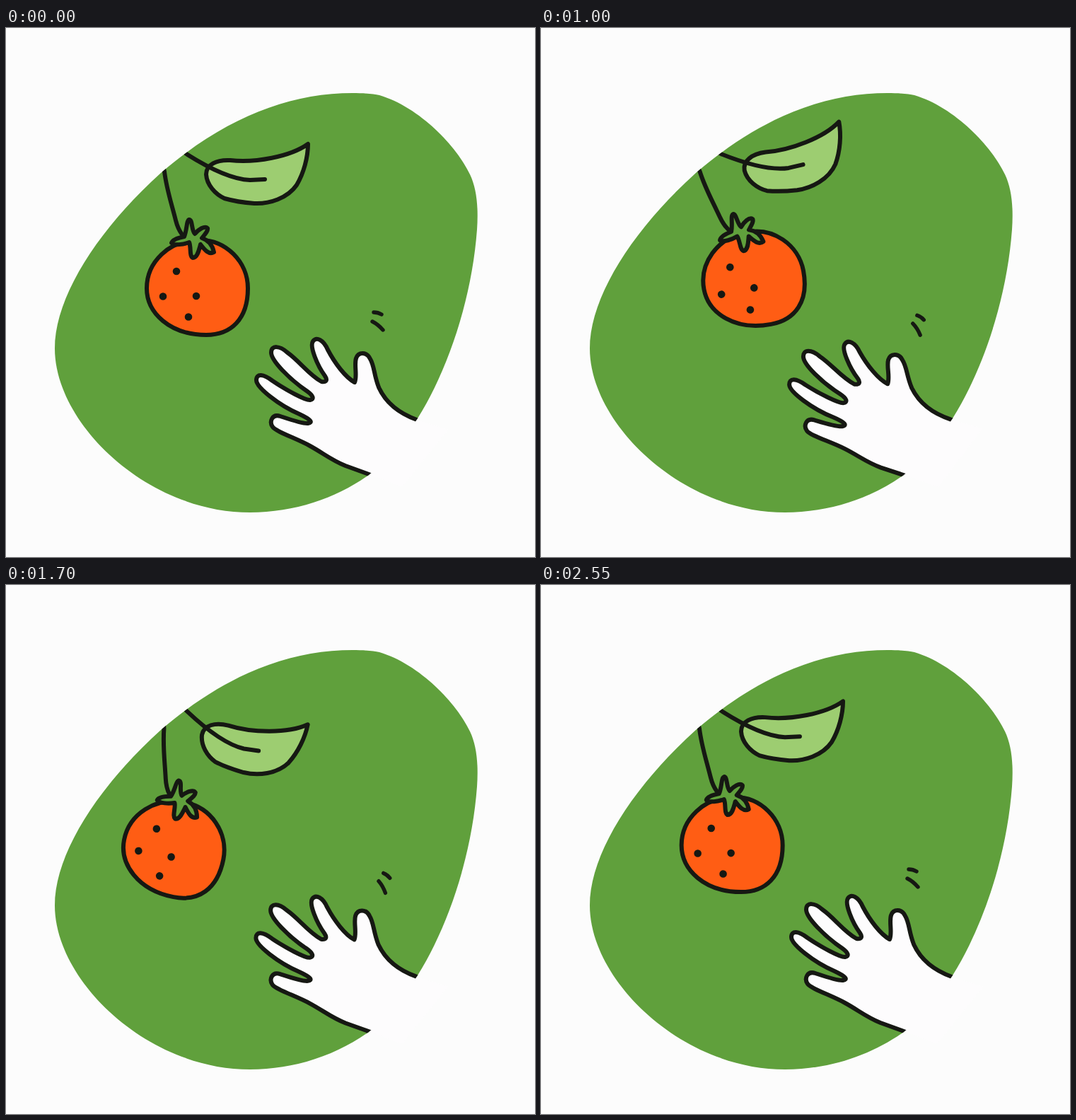
Animation, 748 px wide and 748 px high, one loop 2600 ms. Source, as an HTML page:

```html
<!DOCTYPE html>
<html lang="en">
<head>
<meta charset="utf-8">
<title>Reaching for fruit</title>
<style>
  html, body { margin: 0; width: 100%; height: 100%; overflow: hidden; background: #fcfcfc; }
  svg { display: block; width: 100%; height: 100%; }
  .ink { fill: none; stroke: #161813; stroke-width: 6; stroke-linecap: round; stroke-linejoin: round; }
  .thin { stroke-width: 5.4; }
  .green { fill: #60a03c; }
  .leaf { fill: #9dcd71; }
  .fruit { fill: #ff5d14; }
  .dots { stroke-width: 10.6; }
  .skin { fill: #fdfcfd; }
</style>
</head>
<body>
<svg viewBox="0 0 748 748">
  <defs>
    <path id="egg" d="M490 92C505 92 520 93 528 95C585 112 638 168 656 207C666 228 668 255 666 285C659 380 627 480 582 552
      C563 582 543 609 513 632C468 664 410 685 345 685C200 685 69 560 69 453C69 380 130 285 220 204C310 127 400 92 490 92Z"/>
    <clipPath id="inside"><use href="#egg"/></clipPath>
    <path id="arm" d="M625 568L581 554C556 545 537 530 527 508C520 490 521 478 515 468C510 457 498 458 495 467
      S497 492 493 501C480 494 465 474 455 455C449 441 439 436 434 443S440 477 451 492
      C455 498 453 501 446 500C428 490 415 471 398 459C387 449 375 448 375 459S400 496 425 513
      C435 520 436 525 430 526S396 512 377 499C364 489 354 488 354 498S385 533 415 546
      C432 554 434 558 427 559S400 553 388 549S372 557 377 564S410 580 430 591S460 611 480 619L513 631L560 649"/>
  </defs>

  <use href="#egg" class="green"/>

  <g clip-path="url(#inside)">
    <g id="leaf">
      <path class="ink leaf" d="M427 164C427 183 421 205 411 222C398 241 372 249 351 248C338 247 323 245 309 241
        C296 235 284 222 283 207C283 193 298 186 317 187C352 191 402 182 427 164Z"/>
      <path class="ink" d="M235 162L255 178C285 197 318 214 345 215L366 214"/>
    </g>
    <g id="fruit">
      <path class="ink" d="M217 175L224 203C227 228 234 248 240 272Q243 284 249 292"/>
      <path class="ink fruit" d="M271 300C311 298 342 331 342 368C342 412 318 434 283 434C232 434 199 403 199 368C199 331 231 300 271 300Z"/>
      <path class="ink green" d="M234 304Q236 298 252 295C256 286 255 272 259 271C264 271 262 286 267 291C272 285 281 279 285 283
        C286 287 281 292 277 297C286 300 292 307 294 317C287 321 281 314 275 306C273 313 271 325 264 325
        C259 322 262 310 259 303C251 306 238 308 234 304Z"/>
      <path class="ink dots" d="M241 344h0M222 379.5h0M269 379h0M258 408.5h0"/>
    </g>
    <path id="marks" class="ink thin" d="M520 402Q526 402 531 405M518 415Q526 419 533 427"/>
  </g>

  <use href="#arm" class="skin" id="palm"/>
  <g clip-path="url(#inside)"><use href="#arm" class="ink" id="outline"/></g>
</svg>

<script>
const LOOP = 2600, STEP = 50;

// Eased rise from 0 to 1 between two times.
function ramp(t, from, to) {
  const k = Math.min(1, Math.max(0, (t - from) / (to - from)));
  return (1 - Math.cos(Math.PI * k)) / 2;
}

// Rises during the first span and falls back during the second.
const hump = (t, a, b, c, d) => ramp(t, a, b) - ramp(t, c, d);

function turn(id, degrees, x, y) {
  document.getElementById(id).setAttribute('transform', `rotate(${degrees} ${x} ${y})`);
}

function draw(now) {
  const t = Math.floor(now % LOOP / STEP) * STEP;

  const sway = 11.9 * (2 * ramp(t, 860, 1810) - ramp(t, 0, 860) - ramp(t, 1810, LOOP));
  turn('leaf', sway, 256, 179);
  turn('fruit', sway, 223, 200);

  const wave = -8 * Math.cos(2 * Math.PI * (t - 1155) / 720) * hump(t, 550, 800, 1890, 2140);
  turn('palm', wave, 566, 597);
  turn('outline', wave, 566, 597);

  turn('marks', 22 * hump(t, 550, 1150, 1750, 2420), 513, 440);
  requestAnimationFrame(draw);
}
draw(0);
</script>
</body>
</html>
```
